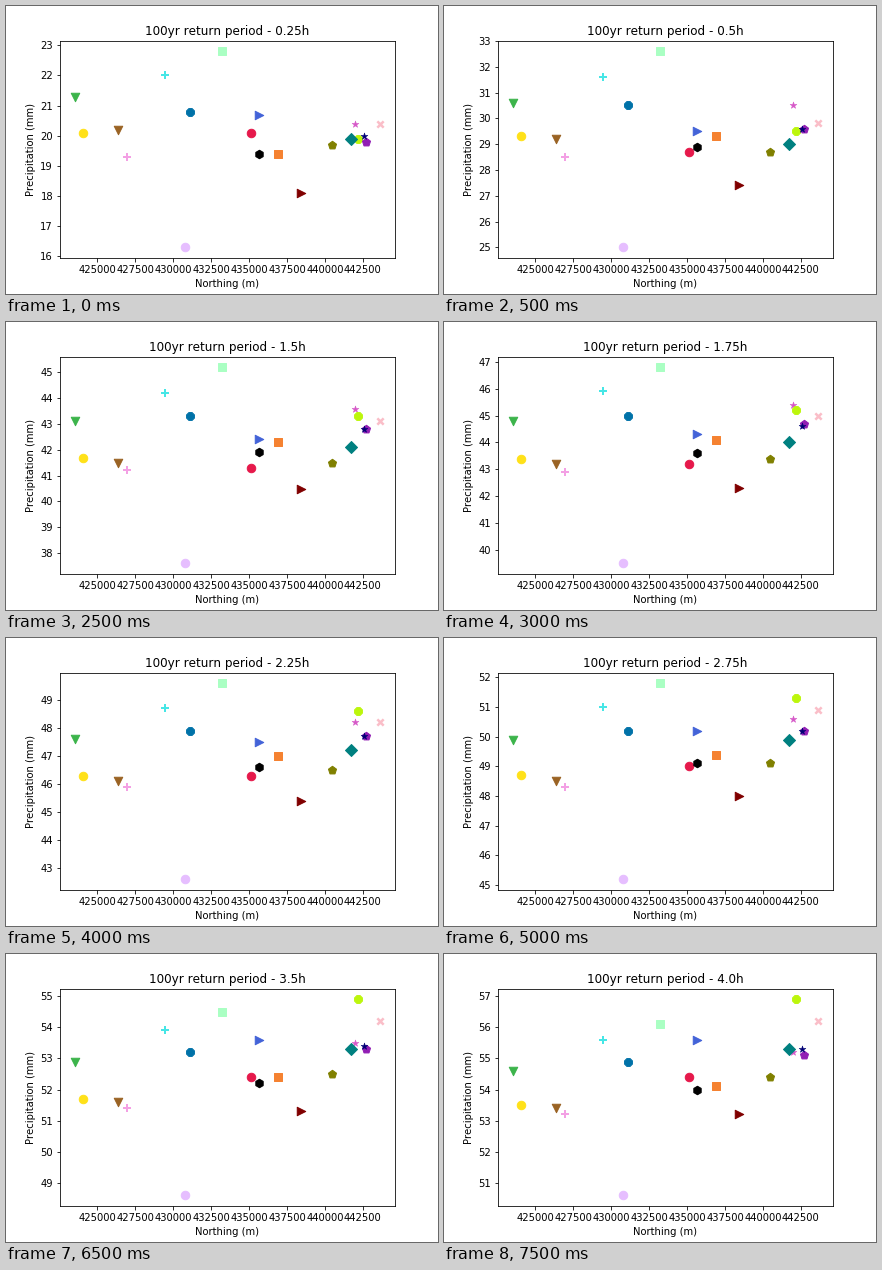
A matplotlib script that plays this animation: 432 by 288 pixels, repeating every 8000 ms.

```python
import math

import matplotlib.pyplot as plt
from matplotlib.animation import FuncAnimation
from matplotlib.ticker import MultipleLocator

FRAMES, INTERVAL = 16, 500
BEND = 1.35  # shared S-shape of the depth curves, in mm

# Northing, marker, colour, depth after 0.25 h, 1 h and 4 h
SITES = [
    (423540, "v", "#3cb44b", 21.3, 38.6, 54.6),
    (424063, "o", "#ffe119", 20.1, 37.2, 53.5),
    (426361, "v", "#9a6324", 20.2, 37.0, 53.4),
    (426927, "+", "#f3a0e4", 19.3, 36.6, 53.2),
    (429432, "+", "#46e6e6", 22.0, 39.7, 55.6),
    (430774, "o", "#e6beff", 16.3, 32.9, 50.6),
    (431120, "8", "#0072a8", 20.8, 38.7, 54.9),
    (433222, "s", "#aaffc3", 22.8, 40.8, 56.1),
    (435100, "o", "#e6194b", 20.1, 36.6, 54.4),
    (435660, ">", "#4363d8", 20.7, 37.6, 55.6),
    (435640, "h", "#000000", 19.4, 37.2, 54.0),
    (436907, "s", "#f58231", 19.4, 37.7, 54.1),
    (438448, ">", "#800000", 18.1, 35.7, 53.2),
    (440466, "p", "#808000", 19.7, 36.8, 54.4),
    (441983, "*", "#d658c8", 20.4, 39.0, 55.2),
    (442156, "8", "#bcf60c", 19.9, 38.2, 56.9),
    (441732, "D", "#008080", 19.9, 37.3, 55.3),
    (442736, "p", "#911eb4", 19.8, 38.1, 55.1),
    (442578, "*", "#000075", 20.0, 38.0, 55.3),
    (443600, "x", "#fabec8", 20.4, 38.2, 56.2),
]

# Marker area and line width where they differ from the default
STYLE = {"+": (72, 2), "x": (40, 2.5), "*": (50, 0.5)}


def depth_at(hours, start, mid, end):
    """Cubic in log duration through the three depths."""
    u = math.log(hours, 4)
    slope, curve = (end - start) / 2, (end + start) / 2 - mid
    return round(mid + slope * u + curve * u**2 - BEND * u * (1 - u**2), 1)


def padded(values, extra=0.0):
    lo, hi = min(values) - extra, max(values) + extra
    pad = 0.05 * (hi - lo)
    return lo - pad, hi + pad


def draw_site(x, marker, colour):
    area, width = STYLE.get(marker, (72, 1))
    return ax.scatter(x, 0, s=area, marker=marker, color=colour, linewidths=width)


plt.rcParams.update({"font.family": "DejaVu Sans", "text.kerning_factor": 6})
fig, ax = plt.subplots(figsize=(6, 4), dpi=72)
fig.subplots_adjust(left=0.125, right=0.9, bottom=0.125, top=0.88)
ax.set_xlabel("Northing (m)")
ax.set_ylabel("Precipitation (mm)")
ax.set_xlim(padded([site[0] for site in SITES]))
ax.xaxis.set_major_locator(MultipleLocator(2500))
ax.yaxis.set_major_locator(MultipleLocator(1))
title = ax.set_title("")
dots = [draw_site(*site[:3]) for site in SITES]


def update(i):
    hours = (i + 1) * 0.25
    depths = [depth_at(hours, *site[3:]) for site in SITES]
    for dot, site, depth in zip(dots, SITES, depths):
        dot.set_offsets([[site[0], depth]])
    ax.set_ylim(padded(depths, 0.03))
    title.set_text(f"100yr return period - {hours}h")
    return [*dots, title]


anim = FuncAnimation(fig, update, frames=FRAMES, interval=INTERVAL,
                     init_func=lambda: update(0), repeat=True,
                     repeat_delay=0, blit=False)
plt.show()
```
